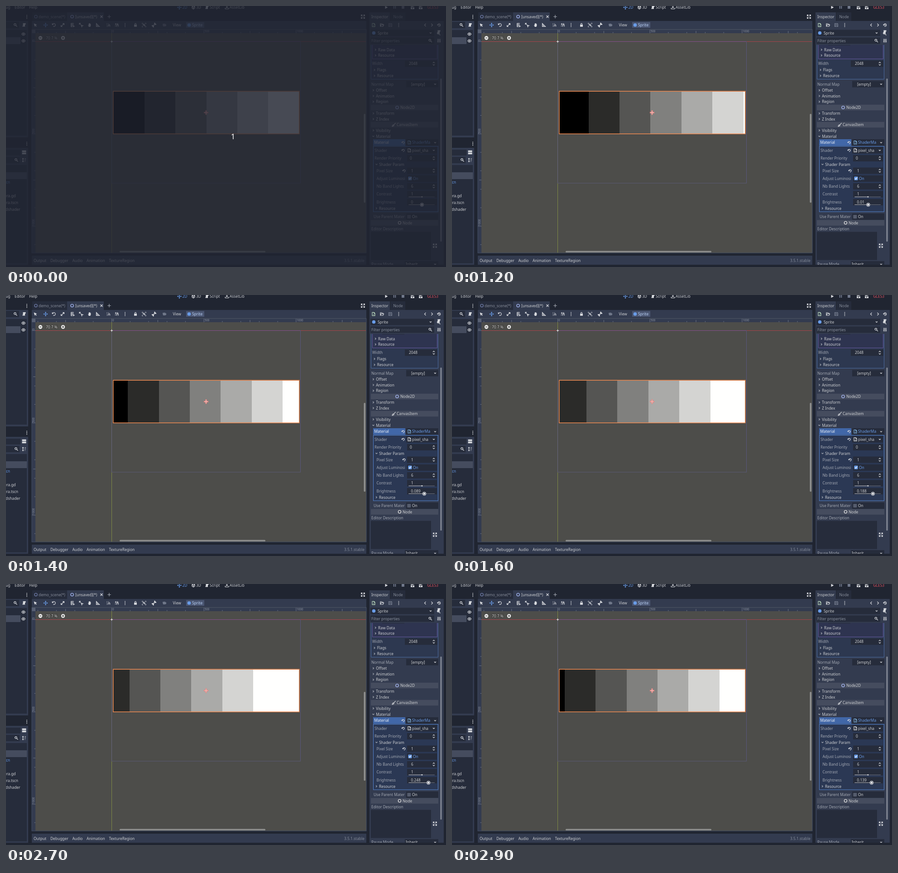
Animation of 972 by 576 pixels, one loop 7100 ms. Source, as an HTML page:

```html
<!DOCTYPE html>
<html lang="en">
<head>
<meta charset="utf-8">
<title>Brightness slider</title>
<style>
html, body { margin: 0; width: 100%; height: 100%; overflow: hidden; background: #202531; }
svg { display: block; width: 972px; height: 576px; }
text { font-family: "Noto Sans", sans-serif; font-size: 8.4px; white-space: pre; }
</style>
</head>
<body>
<svg id="stage" viewBox="0 0 972 576" xmlns="http://www.w3.org/2000/svg"></svg>
<script>
const BASE = '#333b4f', DARK = '#262c3b', DEEP = '#202531';
const TEXT = '#cdcfd2', SOFT = '#a4a9b3', FAINT = '#70788a', BLUE = '#699ce8', NODE = '#a5b7f3';
const stage = document.getElementById('stage');
const out = [];
const add = s => out.push(s);

const rect = (x, y, w, h, fill, extra = '') =>
  add(`<rect x="${x}" y="${y}" width="${w}" height="${h}" fill="${fill}" ${extra}/>`);
const frame = (x, y, w, h, fill, stroke, sw = 1) =>
  rect(x + .5, y + .5, w - 1, h - 1, fill, `stroke="${stroke}" stroke-width="${sw}"`);
const line = (x1, y1, x2, y2, color, w = 1) =>
  add(`<path d="M${x1} ${y1}L${x2} ${y2}" stroke="${color}" stroke-width="${w}" fill="none"/>`);
// y is the optical middle of the text
const text = (x, y, s, fill = TEXT, extra = '') =>
  add(`<text x="${x}" y="${y + 3}" fill="${fill}" ${extra}>${s}</text>`);
const dot = (x, y, r, fill) => add(`<circle cx="${x}" cy="${y}" r="${r}" fill="${fill}"/>`);
const ring = (x, y, color = NODE, r = 3.1) =>
  add(`<circle cx="${x}" cy="${y}" r="${r}" fill="none" stroke="${color}" stroke-width="1.3"/>`);

// icons are drawn around their own centre; the flag marks filled ones
const ICONS = {
  dots: ['M-.8-4.3h1.6v1.8h-1.6zM-.8-.9h1.6v1.8h-1.6zM-.8 2.5h1.6v1.8h-1.6z', 1],
  search: ['M1.1-1a2.2 2.2 0 1 0-4.4 0a2.2 2.2 0 1 0 4.4 0M.6.7L3.5 3.5'],
  script: ['M-2.5-4H3.5V-1H2V3.5H-3.5V1.5H-2.5zM-1.2-2.5H1M-1.2-.7H.8', 1],
  page: ['M-3-3.7H1L3-1.7V3.7H-3zM1-3.7V-1.5H3M-1 1.5H1.5'],
  eye: ['M-4 0Q0-6 4 0Q0 6-4 0M-1 0a1 1 0 1 0 2 0a1 1 0 1 0-2 0'],
  rows: ['M-4.5-4.2h9v3.6h-9zM-4.5.6h9v3.6h-9z', 1],
  sort: ['M-2.5-4V4M-4-2.5L-2.5-4L-1-2.5M-4 2.5L-2.5 4L-1 2.5M1-3H4M1 0H3.5M1 3H2.5'],
  cross: ['M-2.5-2.5L2.5 2.5M2.5-2.5L-2.5 2.5'],
  plus: ['M-3.8 0H3.8M0-3.8V3.8'],
  expand: ['M-3.8-1V-3.8H-1M1-3.8H3.8V-1M3.8 1V3.8H1M-1 3.8H-3.8V1M-3.5-3.5L-1-1M3.5-3.5L1-1M3.5 3.5L1 1M-3.5 3.5L-1 1'],
  arrow: ['M-3-3.5L4-.8L1 .4L3.4 2.8L2.4 3.8L0 1.4L-1 4z', 1],
  move: ['M-4 0H4M0-4V4M-3-1.2L-4.2 0L-3 1.2M3-1.2L4.2 0L3 1.2M-1.2-3L0-4.2L1.2-3M-1.2 3L0 4.2L1.2 3'],
  turn: ['M-3.2-1.2A3.3 3.3 0 1 1-1.8 2.8M-3.8-3.4V-.9H-1.2'],
  scale: ['M-3 3L3-3M0-3.4H3.4V0M-3.5 .3V3.5H-.3'],
  list: ['M-3.7-3.6H2.5M-3.7-1.2H2.5M-3.7 1.2H0M-3.7 3.6H0M-3.2-3.6V3.6M1 1L4 2.5L2 4z'],
  pivot: ['M-4-3.8L-1-1M-4-1V-3.8H-1M0 0L4 1.5L2 2L1.5 4z'],
  hand: ['M-3.8 0L-2 1V-3H-.9V-.5V-4H.3V-.5V-3.5H1.5V0V-2.5H2.8V2L1.5 4H-1.5z', 1],
  ruler: ['M-3.5-3.5V3.5H3.5zM-1.7 .7V1.8H-.5z'],
  snap: ['M-3.5-3H-2M0-3H1.5M-3.5 0H-2M-3.5 3H-2M0 3.5V1a1.7 1.7 0 0 1 3.4 0V3.5'],
  grid: ['M-4-2H0M-2-4V0M1.5-4V-1M-4 2H-1M.3 3.5V1a1.7 1.7 0 0 1 3.4 0V3.5M2-2H4'],
  lock: ['M-3-.8H3V3.8H-3zM-2-.8V-2.2A2 2 0 0 1 2-2.2V-.8H1V-2A1 1 0 0 0-1-2V-.8z', 1],
  group: ['M-4-2.5V-4H-2.5M2.5-4H4V-2.5M4 2.5V4H2.5M-2.5 4H-4V2.5M-2-2H.5V.5H-2zM0 2H2V-.5'],
  bone: ['M-2.2 1L1-2.2A1.5 1.5 0 1 1 2.8-2.8A1.5 1.5 0 1 1 2.2-1L-1 2.2A1.5 1.5 0 1 1-2.8 2.8A1.5 1.5 0 1 1-2.2 1', 1],
  camera: ['M-4-1.5a1.8 1.8 0 0 1 3-1a2 2 0 0 1 3.5 1.5L4-2V2.5L2.5 1.5V3H-3z', 1],
  play: ['M-2.5-3.2L3.5 0L-2.5 3.2z', 1],
  pause: ['M-2.8-3h2v6h-2zM.8-3h2v6h-2z', 1],
  stop: ['M-3-3h6v6h-6z', 1],
  clap: ['M-4-2L3.5-4L4-2.6L-3.5-.5zM-3.8 0H4V4H-3.8zM-1 .7V3.3L2 2z', 1],
  folder: ['M-3.5 3V-3H-.8L.2-2H2.5V-.5M-3.5 3L-2-.5H4L2.5 3z'],
  save: ['M-3.5-3.5H2.5L3.5-2.5V3.5H-3.5zM-1.8-3.3V-1H1.5V-3.3M-2 3.3V1H2V3.3'],
  back: ['M1.5-3L-1.5 0L1.5 3'],
  next: ['M-1.2-2L1-0L-1.2 2'],
  forward: ['M-1.5-3L1.5 0L-1.5 3'],
  down: ['M-2-1L0 1L2-1'],
  spin: ['M-2.1-1.4L0-3.5L2.1-1.4M-2.1 1.4L0 3.5L2.1 1.4'],
  revert: ['M-2.5-.5A2.5 2.5 0 1 1-.5 2.8M-3.7-1L-2.4.6L-.9-1'],
  clock: ['M-2.7-.8A3 3 0 1 1-1.5 2.6M-4-1L-2.6.6L-1.1-1M.3-1.5V.5H2'],
  tune: ['M-2.7-4V4M0-4V4M2.7-4V4M-3.7 1.5H-1.7M-1-1.5H1M1.7 1.5H3.7'],
  brush: ['M3.8-3.8L-1 1M-1.2.3Q-3.5.5-3.8 3.8Q-.3 3.6 0 1.5z'],
  cube: ['M-3-1.8L0-3.5L3-1.8V2L0 3.7L-3 2zM-3-1.8L0 0L3-1.8M0 0V3.7'],
  load: ['M0-3.8V.8M-2-1L0 1L2-1M-3.7 1V3.5H3.7V1'],
};
function icon(name, x, y, color = '#d9dbdf') {
  const [d, solid] = ICONS[name];
  const paint = solid ? `fill="${color}"` : `fill="none" stroke="${color}" stroke-width="1.2"`;
  add(`<path d="${d}" transform="translate(${x} ${y})" ${paint}/>`);
}
const fold = (x, y, label, open) => {
  icon(open ? 'down' : 'next', x, y, SOFT);
  text(x + 5.7, y, label);
};

function menuBar() {
  text(9.5, 3, 'Debug', TEXT, 'text-anchor="end"');
  text(19, 3, 'Editor');
  text(51, 3, 'Help');
  icon('move', 383, 3, BLUE);
  text(389.5, 3, '2D', BLUE);
  icon('cube', 414, 3);
  text(420, 3, '3D');
  icon('script', 444, 3);
  text(450, 3, 'Script');
  icon('load', 488, 3);
  text(494, 3, 'AssetLib');
  icon('play', 840, 3);
  icon('pause', 858.5, 3, FAINT);
  icon('stop', 877, 3, FAINT);
  icon('clap', 898, 3);
  icon('clap', 916, 3);
  text(930.5, 3, 'GLES3', '#e0525f');
}

function leftDocks() {
  rect(0, 33, 49, 257, BASE);
  rect(0, 313, 49, 258, BASE);
  icon('dots', 46, 24);
  icon('dots', 46, 304);
  rect(0, 35, 29, 14, DARK);
  icon('search', 21, 42);
  icon('script', 40, 42);
  rect(0, 53, 46, 233, DARK);
  rect(0, 69, 32, 15, '#454c5e');
  icon('eye', 38.5, 62);
  icon('eye', 38.5, 77);
  rect(0, 317, 32, 13, DARK);
  icon('rows', 40, 323);
  rect(0, 333, 30, 14, DARK);
  icon('search', 23, 340);
  icon('sort', 40, 340);
  rect(0, 351, 46, 217, DARK);
  rect(0, 367, 46, 15, '#454c5e');
  const end = 'text-anchor="end"';
  text(9, 389, 'scn', BLUE, end);
  text(21.5, 419, 'camera.gd', TEXT, end);
  text(27, 434, 'camera.tscn', TEXT, end);
  text(31.5, 449, 'gdshader', TEXT, end);
}

function toolBar() {
  rect(58, 14, 77, 19, DARK);
  rect(135, 14, 81, 19, BASE);
  ring(66, 23.5, '#6f7ca8');
  text(72, 23.5, 'demo_scene(*)', '#858b98');
  ring(146, 23.5);
  text(153, 23.5, '[unsaved](*)');
  icon('cross', 211, 23.5);
  icon('plus', 228, 23.5, SOFT);
  icon('expand', 788.5, 23.5);
  rect(57, 33, 739, 18, BASE);
  const tools = { arrow: 64.5, turn: 106, scale: 125, list: 147, pivot: 166, hand: 184.5, ruler: 203,
    snap: 226, grid: 244.5, dots: 263, lock: 286, group: 305, bone: 327 };
  for (const name in tools) icon(name, tools[name], 42);
  icon('move', 87.5, 42, BLUE);
  icon('camera', 350, 42, FAINT);
  text(368.5, 42, 'View');
  rect(398, 35.5, 40, 12.5, '#4b5672');
  dot(404.5, 42, 3.8, BLUE);
  text(411, 42, 'Sprite', '#b9d1f5');
}

function rulers() {
  const unit = .4074, ox = 233.5, oy = 78.5;
  rect(57, 52, 739, 8, BASE);
  rect(57, 52, 8, 493, BASE);
  for (let i = -8; i < 28; i++) {
    const len = i % 10 === 0 ? 8 : i % 5 === 0 ? 5 : 2.5;
    const x = ox + i * unit * 50, y = oy + i * unit * 50;
    if (i % 2 && i % 5) continue;
    if (x > 66 && x < 795) line(x, 60 - len, x, 60, '#6d7484');
    if (y > 60 && y < 544) line(65 - len, y, 65, y, '#6d7484');
  }
  for (const n of [0, 500, 1000]) {
    const style = 'style="font-size:6.2px"';
    text(ox + 1.5 + n * unit, 55, n, '#9096a2', style);
    add(`<text transform="translate(62.5 ${oy - 1 + n * unit}) rotate(-90)" fill="#9096a2" ${style}>${n}</text>`);
  }
  rect(57, 52, 8, 8, '#596073');
}

function viewport() {
  rect(57, 51, 739, 494, '#4d4d4a');
  rulers();
  line(65, 78.5, 795, 78.5, '#a9434b');
  line(233.5, 60, 233.5, 545, '#7f8a45');
  line(233, 78.5, 650.5, 78.5, '#86508c');
  line(233.5, 78, 233.5, 391, '#66677f');
  line(650.5, 78, 650.5, 391, '#59557c');
  line(233, 391, 651, 391, '#5b5a72');
  line(231, 78.5, 236, 78.5, '#fff');
  line(233.5, 76, 233.5, 81, '#fff');
  for (const x of [76, 126]) {
    dot(x, 70.5, 4.2, '#f0f0f0');
    line(x - 2.3, 70.5, x + 2.3, 70.5, '#3c3c3a', 1.3);
  }
  line(126, 68.2, 126, 72.8, '#3c3c3a', 1.3);
  text(88, 70.5, '70.7 %', '#e4e4e4', 'stroke="#2c2c2a" stroke-width="1.6" paint-order="stroke"');
  add('<g id="bands"></g>');
  rect(236.8, 188.2, 411, 94, 'none', 'stroke="#ee8a52" stroke-width="1.5"');
  add('<path d="M437 235.3H447M442 230.3V240.3" stroke="#e57f7c" stroke-width="3" fill="none"/>');
  add('<path d="M438 235.3H446M442 231.3V239.3" stroke="#f8cbc6" stroke-width="1.1" fill="none"/>');
  rect(790.5, 238, 3.5, 196, '#8f908f', 'rx="1.5"');
  rect(251, 540.5, 322, 3.2, '#8f908f', 'rx="1.5"');
  frame(56.5, 51.5, 740, 494, 'none', '#455068');
}

function bottomBar() {
  rect(57, 551, 739, 20, BASE);
  const tabs = { Output: 61, Debugger: 98, Audio: 146.5, Animation: 178, TextureRegion: 227.5 };
  for (const name in tabs) text(tabs[name], 561.5, name);
  text(747, 561.5, '3.5.1.stable', '#858c9a');
}

const field = (x, y, w, h = 14) => rect(x, y - h / 2, w, h, DARK);
function category(y, x, label) {
  rect(806, y - 6.2, 149, 12.4, '#454c5e');
  text(x, y, label);
}
function numberRow(y, x, label, value, valueX) {
  text(x, y, label, SOFT);
  field(x < 812 ? 881 : 886, y, x < 812 ? 72 : 66);
  text(valueX, y, value);
  icon('spin', 945, y);
}

function inspectorHead() {
  rect(803, 14, 45, 19, BASE);
  rect(849, 14, 33, 19, DARK);
  text(807, 23.5, 'Inspector');
  text(855.5, 23.5, 'Node', '#858b98');
  rect(803, 33, 164, 538, BASE);
  icon('page', 812, 42, '#b9d8bd');
  icon('folder', 830.5, 42);
  icon('save', 849, 42, FAINT);
  icon('dots', 867.5, 42);
  icon('back', 926, 42);
  icon('forward', 941, 42);
  icon('clock', 956.5, 42);
  field(805, 59.5, 141);
  dot(812.5, 59.5, 3.8, BLUE);
  text(821, 59.5, 'Sprite');
  icon('down', 938, 59.5);
  icon('script', 956, 57.5);
  icon('search', 956, 61);
  field(805, 76.5, 141);
  text(807, 76.5, 'Filter properties', '#8c93a1');
  icon('search', 937.5, 76.5);
  icon('tune', 956.5, 76.5);
}

function spriteProps() {
  rect(806, 86, 149, 76, '#2d3850');
  add('<path d="M806.5 86V161.5H954.5V86" fill="none" stroke="#4a6a9f"/>');
  rect(809, 86, 144, 31, '#2e3450');
  add('<path d="M809.5 86V116.8H952.5V86" fill="none" stroke="#66599f"/>');
  line(831, 86.5, 880, 86.5, DARK);
  fold(816.3, 96.5, 'Raw Data');
  fold(816.3, 109, 'Resource');
  numberRow(127.3, 809, 'Width', '2048', 890);
  fold(814, 141, 'Flags');
  fold(814, 154, 'Resource');
  text(807, 172.5, 'Normal Map', SOFT);
  field(884, 172.5, 71);
  text(895, 172.5, '[empty]');
  icon('down', 948, 172.5);
  ['Offset', 'Animation', 'Region'].forEach((s, i) => fold(811.5, 186 + i * 12.6, s));
  category(224, 871, 'Node2D');
  ring(864, 224);
  fold(811.5, 237, 'Transform');
  fold(811.5, 249.5, 'Z Index');
  category(262, 863, 'CanvasItem');
  icon('brush', 857, 262);
  fold(811.5, 274.5, 'Visibility');
  fold(811.5, 287.5, 'Material', true);
}

function materialProps() {
  rect(811, 294, 71, 14.5, '#4167a8');
  text(813.5, 301.3, 'Material', '#f0f3f8');
  icon('revert', 877.5, 301.3);
  field(884, 301.3, 71, 14.5);
  icon('page', 891, 301.3, '#7fb0d9');
  text(897, 301.3, 'ShaderMa', BLUE);
  icon('down', 948, 301.3);
  frame(811, 309, 144, 145.5, '#2b3854', '#5384cd');
  text(814, 318.5, 'Shader', SOFT);
  icon('revert', 877.5, 318.5);
  field(884, 318.5, 68);
  icon('page', 891, 318.5);
  text(897, 318.5, 'pixel_sha');
  icon('down', 945, 318.5);
  numberRow(336, 814, 'Render Priority', '0', 892);
  fold(818.5, 349.5, 'Shader Param', true);
  numberRow(363.5, 818.5, 'Pixel Size', '1', 895);
  icon('revert', 879.5, 363.5);
  text(818.5, 380.8, 'Adjust Luminosi', SOFT);
  field(886, 380.8, 66);
  rect(888.5, 376.5, 8, 8, BLUE, 'rx="1"');
  add('<path d="M890.3 380.5L892 382.3L895 378.6" fill="none" stroke="#fff" stroke-width="1.3"/>');
  text(899, 380.8, 'On', BLUE);
  numberRow(398, 818.5, 'Nb Band Lights', '6', 895);
  text(818.5, 415.3, 'Contrast', SOFT);
  field(886, 415.3, 66);
  text(895, 415.3, '1');
  line(889.5, 421.3, 947, 421.3, '#6d7484');
  line(889.5, 421.3, 919, 421.3, '#b9bcc3');
  rect(917.8, 420, 2.4, 2.4, '#e6e7e9');
  text(818.5, 433, 'Brightness', SOFT);
  field(886, 433, 66);
  add(`<text id="value" x="894.5" y="436" fill="${TEXT}"></text>`);
  line(889.5, 438.5, 947, 438.5, '#6d7484');
  add('<path id="track" fill="none" stroke="#b9bcc3"/>');
  add('<g id="knob"><circle r="4" fill="#f4f4f5"/><circle r="3" fill="#4b5366"/><circle r="2" fill="#fff"/></g>');
  fold(818.3, 446.5, 'Resource');
}

function nodeProps() {
  text(812, 465, 'Use Parent Mater', SOFT);
  field(884, 465, 71);
  rect(886.3, 461, 8, 8, '#555c6d', 'rx="1"');
  text(897, 465, 'On');
  category(478.5, 876, 'Node');
  ring(869.5, 478.5, '#e0e0e0');
  text(807, 491.5, 'Editor Description', SOFT);
  rect(806, 498.5, 133, 62, DARK);
  icon('expand', 947.5, 529);
  add('<clipPath id="fold"><rect x="803" y="560" width="164" height="11"/></clipPath><g clip-path="url(#fold)">');
  rect(881, 563, 74, 14, DARK);
  text(807, 570, 'Pause Mode', SOFT);
  text(883, 570, 'Inherit');
  icon('down', 948, 570);
  add('</g>');
  rect(959.5, 160, 3, 360, '#848a97', 'rx="1.5"');
}

function overlay() {
  add('<g id="dim">');
  rect(0, 0, 972, 576, DEEP, 'opacity=".78"');
  add('<text x="501.5" y="294" fill="#fff" text-anchor="middle" style="font-size:16.5px">1</text></g>');
}

[menuBar, leftDocks, toolBar, viewport, bottomBar, inspectorHead,
  spriteProps, materialProps, nodeProps, overlay].forEach(draw => draw());
stage.innerHTML = out.join('');

const LOOP = 7100, LEFT = 237.3, WIDTH = 410.5;
const SHADES = ['#000', '#2b2b29', '#555553', '#80807e', '#aaaaa8', '#d4d4d2', '#fffffe'];
// time in ms and slider position in steps of 1/101
const STEPS = [[0, 0], [1200, 1], [1300, 4], [1400, 9], [1500, 14], [1600, 19],
  [1700, 24], [1800, 27], [2700, 25], [2800, 20], [2900, 14]];
const $ = id => document.getElementById(id);
const [bands, value, track, knob, dim] = ['bands', 'value', 'track', 'knob', 'dim'].map($);
bands.innerHTML = SHADES.map(c => `<rect y="189" height="93" fill="${c}" shape-rendering="crispEdges"/>`).join('');

function render(t) {
  const b = STEPS.filter(s => s[0] <= t).pop()[1] / 101;
  const edge = k => LEFT + WIDTH * Math.min(1, Math.max(0, k / 6 - b));
  [...bands.children].forEach((band, k) => {
    const x = edge(k), end = k === 6 ? LEFT + WIDTH : edge(k + 1);
    band.setAttribute('x', x);
    band.setAttribute('width', Math.max(0, end - x));
  });
  const x = 918.9 + 58 * b;
  value.textContent = +b.toFixed(3);
  track.setAttribute('d', `M889.5 438.5H${x}`);
  knob.setAttribute('transform', `translate(${x} 438.4)`);
  dim.style.display = t < 100 ? '' : 'none';
}

const start = performance.now();
function tick() {
  render((performance.now() - start) % LOOP);
  requestAnimationFrame(tick);
}
tick();
</script>
</body>
</html>
```
